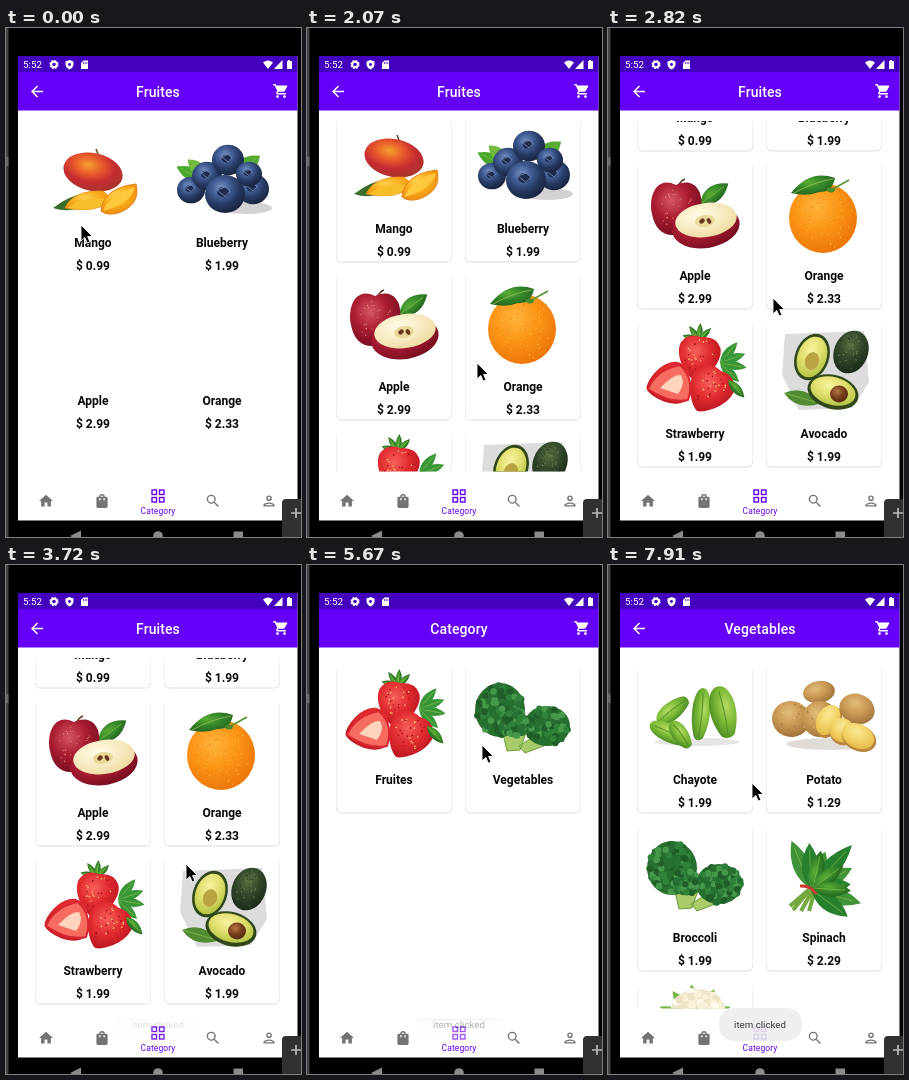
These frames come from a looping animation (295x509 px, 8000 ms). An HTML page:

```html
<!DOCTYPE html>
<html lang="en">
<head>
<meta charset="utf-8">
<style>
  html, body { margin: 0; width: 100%; height: 100%; overflow: hidden; background: #000; }
  svg { display: block; width: 295px; height: 509px; font-family: Roboto, sans-serif; }
  .item { font-size: 12px; font-weight: 700; text-anchor: middle; fill: #080808; }
  .title { font-size: 14px; font-weight: 500; text-anchor: middle; fill: #fff; letter-spacing: .1px; }
</style>
</head>
<body>
<svg id="stage" viewBox="0 0 295 509"></svg>
<script>
const LOOP = 8000;
let seed = 7;
const random = () => (seed = seed * 16807 % 2147483647) / 2147483647;

// Drawing helpers
const oval = (x, y, rx, ry, fill, turn = 0) =>
  `<ellipse rx="${rx}" ry="${ry}" fill="${fill}" transform="translate(${x} ${y}) rotate(${turn})"/>`;
const shape = (d, fill, stroke = 'none', width = 1) =>
  `<path d="${d}" fill="${fill}" stroke="${stroke}" stroke-width="${width}"/>`;
const rect = (x, y, w, h, fill, rx = 0) =>
  `<rect x="${x}" y="${y}" width="${w}" height="${h}" rx="${rx}" fill="${fill}"/>`;
const at = (x, y, body, scale = 1, turn = 0) =>
  `<g transform="translate(${x} ${y}) rotate(${turn}) scale(${scale})">${body}</g>`;
const leaf = (x, y, length, width, turn, fill = 'url(#leaf)') => at(x, y,
  shape(`M0 0Q${length * .45} ${-width} ${length} 0Q${length * .45} ${width} 0 0Z`, fill) +
  shape(`M1 0H${length * .85}`, 'none', '#8fc04d', .6), 1, turn);
const dots = (count, x, y, rx, ry, size, fills) => Array.from({ length: count }, (_, i) => {
  const angle = random() * 2 * Math.PI, reach = Math.sqrt(random());
  return oval((x + Math.cos(angle) * reach * rx).toFixed(1), (y + Math.sin(angle) * reach * ry).toFixed(1),
    size, size, fills[i % fills.length]);
}).join('');
const gradient = (id, ...colors) => `<radialGradient id="${id}" cx=".4" cy=".34" r=".68">` +
  colors.map((c, i) => `<stop offset="${i / (colors.length - 1)}" stop-color="${c}"/>`).join('') + '</radialGradient>';

const gradients = [
  gradient('leaf', '#59ad35', '#36872a', '#23641d'),
  gradient('mango', '#f5a22d', '#e95d2b', '#c52b32', '#a8352a'),
  gradient('flesh', '#ffd04b', '#f9ad1c', '#ec8c10'),
  gradient('berry', '#7893c1', '#435f96', '#253962', '#18233e'),
  gradient('apple', '#d75662', '#a91c31', '#780d20'),
  gradient('cream', '#fffbe4', '#f8edc6', '#efdca5'),
  gradient('orange', '#ffb33c', '#fb9516', '#ed7607'),
  gradient('straw', '#f7605a', '#e12c30', '#b81420'),
  gradient('avocado', '#5b7041', '#32472a', '#1b2a19'),
  gradient('butter', '#f7f3a2', '#e2e070', '#b5c546'),
  gradient('chayote', '#b3db62', '#7eba38', '#4c8e24'),
  gradient('potato', '#e2bd79', '#c99a54', '#a1743a'),
  gradient('slice', '#fae799', '#f3d56a', '#e5ba48'),
  gradient('pit', '#b87843', '#7b421f', '#54290f')
].join('');

// Produce, each drawn around its own centre
const blueberry = (x, y, r) => at(x, y, oval(0, 0, r, r * .95, 'url(#berry)') +
  oval(-r * .1, -r * .1, r * .3, r * .25, '#1d2c4e') +
  shape(`M${-r * .4} ${-r * .2}L0 ${-r * .35} ${r * .25} ${-r * .15} 0 ${r * .12}Z`, 'none', '#7089b5', .9));
const strawberry = (x, y, scale, turn) => at(x, y,
  shape('M-20-12Q-14-23 0-20 14-23 20-12C25 3 8 22 0 24-9 22-25 3-20-12Z', 'url(#straw)') +
  dots(26, 0, -1, 15, 17, .8, ['#f8c276', '#a31320']), scale, turn);
const floret = (x, y, rx, ry) => oval(x, y, rx, ry, '#276f2d') +
  dots(75, x, y, rx * .94, ry * .94, 3.2, ['#1f5e27', '#30823a', '#46994a', '#267032']);
const chayote = (x, y, length, width, turn) => at(x, y, shape(
  `M${-length} 0C${-length} ${-width} ${length * .1} ${-width * 1.4} ${length} ${-width * .5}Q${length * 1.2} 0 ${length} ${width * .5}C${length * .1} ${width * 1.4} ${-length} ${width} ${-length} 0Z`,
  'url(#chayote)') + shape(`M${-length * .8} 0Q0 -2 ${length} 0`, 'none', '#4c8e27', 1), 1, turn);
const potatoSlice = (x, y, rx, ry, turn) =>
  oval(x + 1, y + 2, rx + 1, ry + 1, '#b8843f', turn) + oval(x, y, rx, ry, 'url(#slice)', turn);

const art = {
  Mango: () => shape('M-40 28Q-22 14-10 15L-8 27Q-25 33-40 28Z', '#3c6b2b') +
    oval(0, -8, 30, 19, 'url(#mango)', 12) + shape('M5-26L3-31', 'none', '#67452a', 1.5) +
    shape('M-28 28Q-20 10 10 11L20 20Q3 34-28 28Z', 'url(#flesh)', '#e68b13', .8) +
    shape('M-26 28Q-5 15 17 20Q3 34-26 28Z', '#f8bd2b') +
    shape('M8 31Q10 8 43 4Q48 25 25 33 14 36 8 31Z', 'url(#flesh)', '#e48217', 1) +
    shape('M10 31Q18 13 42 7Q38 24 10 31Z', '#ffc83d'),
  Blueberry: () => oval(24, 28, 26, 6, '#d2d2d2') + leaf(-17, 1, 32, 13, 207, '#4aa92d') +
    leaf(-15, -3, 26, 13, 222, '#70b93d') + leaf(13, -6, 31, 16, -36, '#54a931') +
    blueberry(-31, 10, 14) + blueberry(31, 9, 16) + blueberry(-15, -4, 15) +
    blueberry(6, -20, 16) + blueberry(27, -6, 13) + blueberry(3, 14, 20),
  Apple: () => leaf(5, -9, 35, 16, -36) + shape('M-17-26Q-15-32-10-34', 'none', '#5b3821', 1.5) +
    shape('M-19-28C-38-38-47-17-43 1-40 19-27 26-13 20 6 19 9-3 5-20-1-34-13-31-19-28Z', 'url(#apple)') +
    dots(26, -20, -4, 20, 20, .6, ['#d8877b', '#e4a082']) +
    oval(11, 14, 34, 21, 'url(#apple)', -10) + oval(11, 7, 31, 17, 'url(#cream)', -8) +
    oval(10, 8, 10, 6, '#ead89c', -8) + oval(7, 8, 2.2, 3, '#67381d', 45) + oval(14, 8, 2, 3, '#67381d', -30),
  Orange: () => oval(-1, 5, 34, 35, 'url(#orange)') + dots(90, -1, 5, 31, 32, .6, ['#ffbd51', '#e97e0d']) +
    shape('M7-23L25-33', 'none', '#599232', 1.6) +
    shape('M-33-20Q-14-44 11-35Q8-20-5-21Q-17-16-33-20Z', 'url(#leaf)') +
    shape('M-30-20Q-10-31 9-34', 'none', '#98bd56', .8) + oval(7, -23, 4, 2.5, '#4d8c2c'),
  Strawberry: () => [195, 235, 275, 315].map(a => leaf(4, -31, 17, 6, a)).join('') +
    [-50, -20, 10, 45].map(a => leaf(25, -8, 27, 9, a, '#399638')).join('') +
    strawberry(4, -14, 1, 8) + strawberry(15, 18, 1.06, 30) +
    strawberry(-25, 13, 1, 78) +
    shape('M-47 18Q-38-2-15-6Q0 8-7 29Q-25 33-47 18Z', '#f66c61', '#d92630', 2) +
    shape('M-35 17Q-22 3-14 4Q-9 13-17 23Z', '#ffd4bd') + leaf(33, 9, 24, 9, 47),
  Avocado: () => shape('M-39-37L40-40 45 11 29 37-25 39-42 4Z', '#dcdcdc') +
    leaf(-40, 22, 38, 14, 16, '#528c32') + oval(27, -19, 17, 22, 'url(#avocado)', 22) +
    dots(38, 27, -19, 14, 18, .7, ['#718255', '#22341f']) +
    oval(-12, -14, 17, 24, '#304719', 20) + oval(-12, -14, 14.5, 21, 'url(#butter)', 20) +
    oval(-12, -10, 7, 9, '#b9a343', 18) + oval(9, 21, 26, 17, '#304719', 15) +
    oval(9, 20, 23, 14, 'url(#butter)', 15) + oval(15, 23, 9, 8.5, 'url(#pit)'),
  Chayote: () => oval(2, 25, 43, 4, '#e6e6e6') + chayote(-23, -6, 18, 9, -38) + chayote(-26, 16, 21, 9, 26) +
    chayote(-15, 17, 15, 8, 55) + chayote(6, -4, 25, 9, 96) + chayote(28, -6, 25, 13, 78),
  Potato: () => oval(7, 27, 45, 6, '#e0ddd8') + oval(-5, -25, 16, 11, 'url(#potato)', -10) +
    oval(33, -8, 18, 15, 'url(#potato)', 20) + oval(-33, 2, 19, 18, 'url(#potato)', 12) +
    oval(-4, 2, 18, 18, 'url(#potato)') + dots(24, -22, 0, 25, 14, .7, ['#946c38', '#e8ca91']) +
    potatoSlice(4, 3, 11, 16, 28) + potatoSlice(18, 13, 13, 12, 35) + potatoSlice(34, 19, 17, 12, 25),
  Broccoli: () => shape('M-23 4L-16 34-3 33 5 10ZM16 16L-4 29 2 36 31 25Z', '#a8ca69', '#6d9d3d') +
    floret(-23, -7, 25, 27) + floret(24, 9, 23, 20) + floret(-9, 7, 14, 13),
  Spinach: () => shape('M-12 12L-34 31M-12 12L-31 35M-10 13L-23 36M-8 12L-15 36', 'none', '#72a83e', 4) +
    [-112, -92, -69, -47, -27, -7, 16, 37].map((a, i) =>
      leaf(-13, 14, 52 - i % 3 * 6 + (i === 3 ? 8 : 0), 17, a, i % 2 ? '#27802d' : '#409338')).join('') +
    [-78, -37, 4].map(a => leaf(-11, 13, 38, 15, a)).join('') +
    shape('M-24 11Q-13 10-8 19', 'none', '#ca3b2b', 3),
  Cauliflower: () => [205, 235, 265, 300, 335].map(a => leaf(0, -10, 39, 13, a, '#7bb544')).join('') +
    oval(3, -20, 28, 24, '#eee7cc') + dots(75, 3, -20, 26, 22, 4, ['#fffbed', '#eee4c5', '#f8f0d7'])
};

const column = i => 87 + i % 2 * 129;
const row = i => Math.floor(i / 2) * 158;
const edge = i => {
  const x = column(i) - 57.5, y = row(i), r = x + 115;
  return shape(`M${x} ${y + 105}V${y + 244}M${r} ${y + 105}V${y + 244}`, 'none', '#f1f1f1') +
    shape(`M${x} ${y + 243}Q${x} ${y + 248} ${x + 5} ${y + 248}H${r - 5}Q${r} ${y + 248} ${r} ${y + 243}`, 'none', '#dedede');
};
const card = ([name, price, picture = name], i) => {
  const x = column(i), y = row(i);
  return `<g class="art row${row(i) / 158}">${at(x, y + 152, art[picture]())}</g>` +
    `<text class="item" x="${x}" y="${y + 219}">${name}</text>` +
    (price ? `<text class="item" x="${x}" y="${y + 242}">$ ${price}</text>` : '');
};
const page = (id, items) => `<g id="${id}"><g class="edges">${items.map((_, i) => edge(i)).join('')}</g>` +
  items.map(card).join('') + '</g>';

const icon = (x, y, scale, d, fill) => at(x - 12 * scale, y - 12 * scale, `<path d="${d}" fill="${fill}" fill-rule="evenodd"/>`, scale);
const navIcons = [
  [40, 'M10 20v-6h4v6h5v-8h3L12 3 2 12h3v8z'],
  [96, 'M18 6h-2a4 4 0 0 0-8 0H6a2 2 0 0 0-2 2v12a2 2 0 0 0 2 2h12a2 2 0 0 0 2-2V8a2 2 0 0 0-2-2zM12 4a2 2 0 0 1 2 2h-4a2 2 0 0 1 2-2zM8 8h2v3H8zM14 8h2v3h-2z'],
  [207, 'M15.5 14h-.8l-.3-.3a6.5 6.5 0 1 0-.7.7l.3.3v.8l5 5 1.5-1.5zM9.5 14a4.5 4.5 0 1 1 0-9 4.5 4.5 0 0 1 0 9z'],
  [263, 'M12 4a4 4 0 1 0 0 8 4 4 0 0 0 0-8zM12 6a2 2 0 1 1 0 4 2 2 0 0 1 0-4zM4 20v-2c0-2.700 5.300-4 8-4s8 1.300 8 4v2zM6 18h12c-.2-.7-3.300-2-6-2s-5.800 1.300-6 2z']
].map(([x, d]) => icon(x, 473, .7, d, '#747474')).join('');
const gridIcon = [[146, 462], [153.500, 462], [146, 469.500], [153.500, 469.500]].map(([x, y]) =>
  `<rect x="${x}" y="${y}" width="4.500" height="4.500" fill="none" stroke="#6500f0" stroke-width="1.400"/>`).join('');
const gear = oval(48, 36.500, 2.800, 2.800, 'none" stroke="#fff" stroke-width="2') +
  `<circle cx="48" cy="36.500" r="4" fill="none" stroke="#fff" stroke-width="1.200" stroke-dasharray="1.800 1.340"/>`;
const statusIcons = gear +
  shape('M63.500 32L67.500 33.500V36.500Q67 40 63.500 41.500 60 40 59.500 36.500V33.500Z', '#fff') + oval(63.500, 36.500, 1.400, 1.400, '#4300bd') +
  shape('M77.500 32.500H82V41H75V35Z', '#fff') + shape('M77.500 34V36M79.200 34V36M80.800 34V36', 'none', '#4300bd', .7) +
  shape('M257 34.500Q262 30.500 267 34.500L262 41Z', '#fff') + shape('M276.500 32V41H268Z', '#fff') +
  shape('M282 32H284V33H286V41H281V33H282Z', '#fff');

const stage = document.getElementById('stage');
stage.innerHTML = `<defs>${gradients}
  <clipPath id="view"><rect x="29" y="93" width="246" height="350.500"/></clipPath>
  <clipPath id="drawn"><path id="drawnArea"/></clipPath></defs>` +
  rect(0, 0, 295, 509, '#000') + rect(0, 0, 2.500, 509, '#454545') + rect(0, 129, 2.500, 9, '#686868') +
  rect(12, 28, 279.500, 464.500, '#fff') + rect(12, 28, 279.500, 16, '#4300bd') + rect(12, 44, 279.500, 38.500, '#6500f8') +
  '<text x="17" y="40" font-size="9.800" fill="#fff">5:52</text>' + statusIcons +
  '<circle id="ripple" cx="31" cy="64" r="13" fill="#5600d0"/>' +
  `<g id="back">${icon(31, 63.500, .75, 'M20 11H7.830l5.590-5.590L12 4l-8 8 8 8 1.410-1.410L7.830 13H20z', '#fff')}</g>` +
  '<text id="title" class="title" x="152" y="69"></text>' +
  icon(275, 63, .7, 'M7 18a2 2 0 1 0 0 4 2 2 0 0 0 0-4zM1 2v2h2l3.600 7.600-1.350 2.450A2 2 0 0 0 7 17h12v-2H7.420l-.22-.37.9-1.630h7.450c.75 0 1.410-.41 1.750-1.030l3.580-6.490A1 1 0 0 0 20 4H5.210L4.270 2zM17 18a2 2 0 1 0 0 4 2 2 0 0 0 0-4z', '#fff') +
  '<g clip-path="url(#view)">' +
  page('fruits', [['Mango', '0.99'], ['Blueberry', '1.99'], ['Apple', '2.99'], ['Orange', '2.33'], ['Strawberry', '1.99'], ['Avocado', '1.99']]) +
  page('categories', [['Fruites', '', 'Strawberry'], ['Vegetables', '', 'Broccoli']]) +
  page('vegetables', [['Chayote', '1.99'], ['Potato', '1.29'], ['Broccoli', '1.99'], ['Spinach', '2.29'], ['Cauliflower', '1.99']]) +
  '</g>' + navIcons + gridIcon +
  '<text x="152" y="486" font-size="8.500" letter-spacing=".12" text-anchor="middle" fill="#6500f0">Category</text>' +
  `<g id="toast"><rect id="bubble" x="111" width="83" fill-opacity=".88"/><path id="rim" d="M111 454.500H193" stroke="#dedede"/>
    <text x="152" y="463" font-size="9.700" text-anchor="middle" fill="#3b3b3b">item clicked</text></g>` +
  shape('M75 502.500V513L64 508Z', '#8b8b8b') + oval(152, 508, 4.800, 4.800, '#8b8b8b') + rect(227.500, 503.500, 9.500, 9, '#8b8b8b') +
  rect(276, 471, 24, 45, '#303133', 4) + shape('M290 480V490M285 485H295', 'none', '#b9b9b9', 1.700) +
  `<g id="cursor">${shape('M0 0V16L3.800 12.500 6.300 18 9 17 6.600 11.500H11.500Z', '#000', '#fff', .9)}</g>`;

// Each track holds its value until the next time
const pointer = [[0, 75, 197], [150, 80, 204], [300, 82, 208], [600, 95, 235], [740, 106, 259], [890, 82, 208],
  [1340, 142, 289], [1490, 160, 330], [1630, 171, 351], [1930, 170, 335], [2080, 168, 300], [2230, 160, 235],
  [2370, 154, 189], [2670, 156, 215], [2820, 165, 270], [2970, 173, 315], [3120, 190, 360], [3270, 208, 415],
  [3720, 180, 299], [3870, 150, 235], [4020, 105, 160], [4170, 65, 100], [4320, 42, 72], [4470, 35, 65],
  [5370, 70, 95], [5520, 130, 145], [5670, 175, 180], [5820, 194, 192], [6420, 165, 190], [6570, 115, 185],
  [6720, 86, 181], [7020, 110, 215], [7170, 150, 265], [7320, 190, 315], [7470, 214, 342], [7910, 144, 218]];
const scroll = [[0, 0], [1930, 14], [2080, 48], [2230, 94], [2370, 128], [2670, 125]];
const toastAlpha = [[0, 0], [3720, .15], [3870, 1], [5670, .4], [5820, 0], [7020, .15], [7170, 1]];
const screens = [[0, 'fruits', 'Fruites'], [5220, 'categories', 'Category'], [6120, 'vegetables', 'Vegetables']];
const drawnAreas = [[0, ''], [150, 'M42 400H265V444H42Z'],
  [1340, 'M42 400H265V444H42ZM82 208H146V369H82Z'], [1930, 'M0 0H295V800H0Z']];
const hold = (track, t) => track.findLast(key => key[0] <= t).slice(1);

const $ = id => document.getElementById(id);
const show = (node, visible) => node.style.display = visible ? '' : 'none';
const set = (id, attributes) => Object.entries(attributes).forEach(([k, v]) => $(id).setAttribute(k, v));
stage.querySelector('#fruits .edges').setAttribute('clip-path', 'url(#drawn)');
const lateFruit = stage.querySelectorAll('#fruits .row1, #fruits .row2');
const lateVegetable = stage.querySelector('#vegetables .row2');

function draw(t) {
  const [screen, title] = hold(screens, t);
  screens.forEach(([, id]) => show($(id), id === screen));
  if ($('title').textContent !== title) $('title').textContent = title;
  show($('back'), screen !== 'categories');
  show($('ripple'), t >= 4920 && t < 5220);
  lateFruit.forEach(node => show(node, t >= 150));
  show(lateVegetable, t >= 6420);
  set('drawnArea', { d: hold(drawnAreas, t)[0] });
  set('fruits', { transform: `translate(0 ${-hold(scroll, t)[0]})` });
  set('cursor', { transform: `translate(${hold(pointer, t)})` });

  const firstToast = t < 6000;
  set('toast', { opacity: hold(toastAlpha, t)[0] });
  set('bubble', firstToast ? { y: 454, height: 21, rx: 0, fill: '#fcfcfc' } : { y: 443, height: 33, rx: 15, fill: '#ededed' });
  show($('rim'), firstToast);
}

const start = performance.now();
function tick() {
  draw((performance.now() - start) % LOOP);
  requestAnimationFrame(tick);
}
tick();
</script>
</body>
</html>
```
